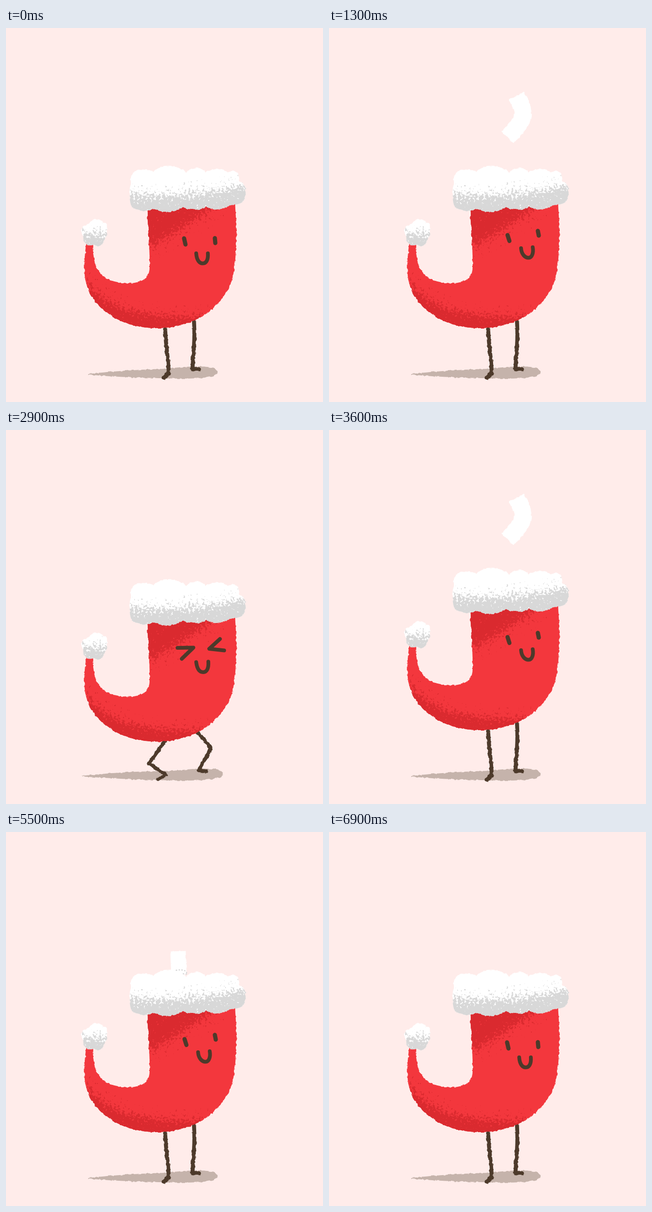
An HTML page without scripts for the animation above (7100 ms loop, 680x800 px).

```html
<!DOCTYPE html>
<html lang="en">
<head>
<meta charset="utf-8">
<title>Festive stocking</title>
<style>
  @property --squat { syntax: "<number>"; inherits: true; initial-value: 0; }
  @property --up { syntax: "<number>"; inherits: true; initial-value: 0; }

  html, body { margin: 0; width: 100%; height: 100%; overflow: hidden; background: #ffecea; }
  svg { display: block; width: 680px; height: 800px; animation: act 7.1s step-end infinite; }

  .stocking { transform: translateY(calc(var(--squat) * 24.5px)); }
  .standing { opacity: calc(1 - var(--squat)); }
  .squatting { opacity: var(--squat); }
  .calm { opacity: calc(1 - var(--squat) - var(--up)); }
  .gazing { opacity: var(--up); }

  .ink { fill: none; stroke: #4d3a2b; stroke-linecap: round; stroke-linejoin: round; }
  .legs { stroke-width: 8.5; }
  .squatting .legs { stroke-width: 7.5; }
  .face { stroke-width: 8; }
  .eyes { stroke-width: 9; }
  .shadow { fill: #c5b3ab; }
  .body { fill: #f3373d; }
  .shade { fill: #da2a2f; }
  .fur { fill: #fff; }
  .grey { fill: #d8d8d8; }

  /* Each puff shows for 200 ms, three times per loop, starting at --at */
  .puff { fill: none; stroke: #fff; visibility: hidden; animation: flash 7.1s calc(var(--at) * 1ms) step-end infinite; }

  @keyframes act {
    0%, 5.633%, 32.394%, 38.028%, 64.788%, 70.422%, 97.183%, 100% { --squat: 0; --up: 0; }
    2.816%, 8.45%, 35.211%, 40.845%, 67.605%, 73.239% { --squat: 1; --up: 0; }
    12.676%, 45.07%, 77.464% { --squat: 0; --up: 1; }
  }
  @keyframes flash {
    0%, 32.394%, 64.788% { visibility: visible; }
    2.816%, 35.211%, 67.605%, 100% { visibility: hidden; }
  }
</style>
</head>
<body>
<svg viewBox="0 0 680 800" role="img" aria-label="A smiling stocking squats and shoots out a white puff">
  <defs>
    <filter id="rough" filterUnits="userSpaceOnUse" x="0" y="0" width="680" height="800" color-interpolation-filters="sRGB">
      <feTurbulence type="fractalNoise" baseFrequency=".13" numOctaves="2" seed="4"/>
      <feDisplacementMap in="SourceGraphic" scale="5" xChannelSelector="R" yChannelSelector="G"/>
    </filter>
    <!-- Breaks up the soft edge of a shape into specks -->
    <filter id="grain" filterUnits="userSpaceOnUse" x="0" y="0" width="680" height="800" color-interpolation-filters="sRGB">
      <feTurbulence type="fractalNoise" baseFrequency=".22" numOctaves="2" seed="9" result="noise"/>
      <feGaussianBlur in="SourceAlpha" stdDeviation="11" result="soft"/>
      <feComposite in="soft" in2="noise" operator="arithmetic" k2="1" k3="2" k4="-1"/>
      <feComponentTransfer result="specks"><feFuncA type="linear" slope="6" intercept="-2.5"/></feComponentTransfer>
      <feMorphology in="SourceGraphic" operator="dilate" radius="24"/>
      <feComposite in2="specks" operator="in"/>
    </filter>

    <path id="sockShape" d="M302 375 C304 425 309 470 308 512 C308 535 292 546 262 546 C205 544 187 522 186 463 H172 C167 495 167 525 171 542 C184 600 245 642 325 642 C390 641 437 616 468 573 C495 540 492 480 495 435 L491 370Z"/>
    <path id="cuffShape" d="M268 330 C264 308 282 300 297 303 Q310 303 317 308 C328 291 372 291 387 310 C396 296 420 296 428 308 C440 299 466 300 476 309 C488 302 500 306 501 328 C514 332 516 346 512 362 C510 374 496 380 482 378 C470 386 456 389 446 388 C438 387 432 384 430 381 C420 391 396 390 379 383 C366 396 330 396 318 386 C300 394 282 392 272 384 C262 374 266 350 268 330Z"/>
    <path id="pomShape" d="M163 440 C158 430 168 420 177 419 C182 407 202 406 207 415 C219 418 220 432 216 440 C215 452 208 456 207 462 C200 468 192 466 188 463 C180 467 172 464 169 459 C164 456 168 448 163 440Z"/>
    <clipPath id="inSock"><use href="#sockShape"/></clipPath>
    <clipPath id="inCuff"><use href="#cuffShape"/></clipPath>
    <clipPath id="inPom"><use href="#pomShape"/></clipPath>
  </defs>

  <rect width="680" height="800" fill="#ffecea"/>

  <g class="standing">
    <path class="shadow" filter="url(#rough)" d="M177 740 C240 733 300 730 345 729 C400 722 454 721 454 736 C454 750 400 751 330 749 C280 748 220 746 177 741Z"/>
    <g class="ink legs" filter="url(#rough)">
      <path d="M341 636 C343 690 349 710 349 738 L339 748"/>
      <path d="M403 622 C406 670 402 690 400 729 L414 730"/>
    </g>
  </g>
  <g class="squatting">
    <path class="shadow" filter="url(#rough)" d="M162 740 C210 735 240 733 260 732 C310 729 350 731 390 726 C435 722 466 725 466 736 C464 750 400 751 330 749 C270 748 210 744 162 741Z"/>
    <g class="ink legs" filter="url(#rough)">
      <path d="M342 664 L307 713 L343 738 L326 747"/>
      <path d="M411 646 L440 681 L413 728 L430 730"/>
    </g>
  </g>

  <g class="stocking">
    <g filter="url(#rough)">
      <use class="body" href="#sockShape"/>
      <g class="shade" clip-path="url(#inSock)">
        <path filter="url(#grain)" d="M260 330 H480 L440 388 Q385 420 345 449 L305 468 H260Z"/>
        <path filter="url(#grain)" d="M140 535 L176 548 Q214 591 272 606 Q340 621 425 616 L440 690 H140Z"/>
      </g>
    </g>
    <g filter="url(#rough)">
      <use class="fur" href="#cuffShape"/>
      <g class="grey" clip-path="url(#inCuff)">
        <path filter="url(#grain)" d="M230 351 Q380 374 550 326 V430 H230Z"/>
      </g>
    </g>
    <g filter="url(#rough)">
      <use class="fur" href="#pomShape"/>
      <g class="grey" clip-path="url(#inPom)">
        <path filter="url(#grain)" d="M130 440 H250 V500 H130Z"/>
      </g>
    </g>

    <g class="ink face calm">
      <path class="eyes" d="M382 450 L385 463 M448 449.5 L449 460"/>
      <path d="M408 482 C409 497 415 503.5 422 503.5 C430 503.5 434 495 433 482"/>
    </g>
    <g class="ink face gazing">
      <path class="eyes" d="M383 443 L387 455.5 M448 434 L450 444"/>
      <path d="M412 471 C413 485 421 491.5 428 491.5 C436 491.5 439 480 437 469"/>
    </g>
    <g class="ink face squatting">
      <path d="M368 441.5 L402 441 L377 465 M459 422.5 L436 443.5 L468 447"/>
      <path d="M408 472 C410 488 416 493.5 423 493.5 C431 493.5 435 485 434 471"/>
    </g>
  </g>

  <g stroke-width="37">
    <g class="puff" style="--at:900">
      <path stroke-width="33" filter="url(#rough)" d="M369 255 L369.5 270 L371 305"/>
      <path stroke="#d8d8d8" stroke-width="2.5" stroke-dasharray="3 3" d="M364 296 Q378 293 386 298 L389 304 L378 303"/>
    </g>
    <path class="puff" style="--at:1100" filter="url(#rough)" d="M366 300 C350 266 362 252 383 234 C405 215 416 203 416 180"/>
    <path class="puff" style="--at:1300" filter="url(#rough)" d="M402 145 C422 182 424 193 383 234"/>
  </g>
  <g stroke-linecap="round" stroke-width="14">
    <ellipse class="puff" style="--at:1500" cx="380" cy="150" rx="48" ry="38" pathLength="10" stroke-dasharray=".35 .65" stroke-linecap="butt" stroke-width="36"/>
    <ellipse class="puff" style="--at:1700" cx="368" cy="168" rx="128" ry="72" pathLength="12" stroke-dasharray=".2 .8" stroke-linecap="butt" stroke-width="40"/>
    <ellipse class="puff" style="--at:1900" cx="360" cy="180" rx="216" ry="96" pathLength="14" stroke-dasharray=".12 .88" stroke-linecap="butt" stroke-width="26"/>
    <ellipse class="puff" style="--at:2100" cx="360" cy="185" rx="239" ry="108" pathLength="14" stroke-dasharray=".01 .99"/>
  </g>
</svg>
</body>
</html>
```
